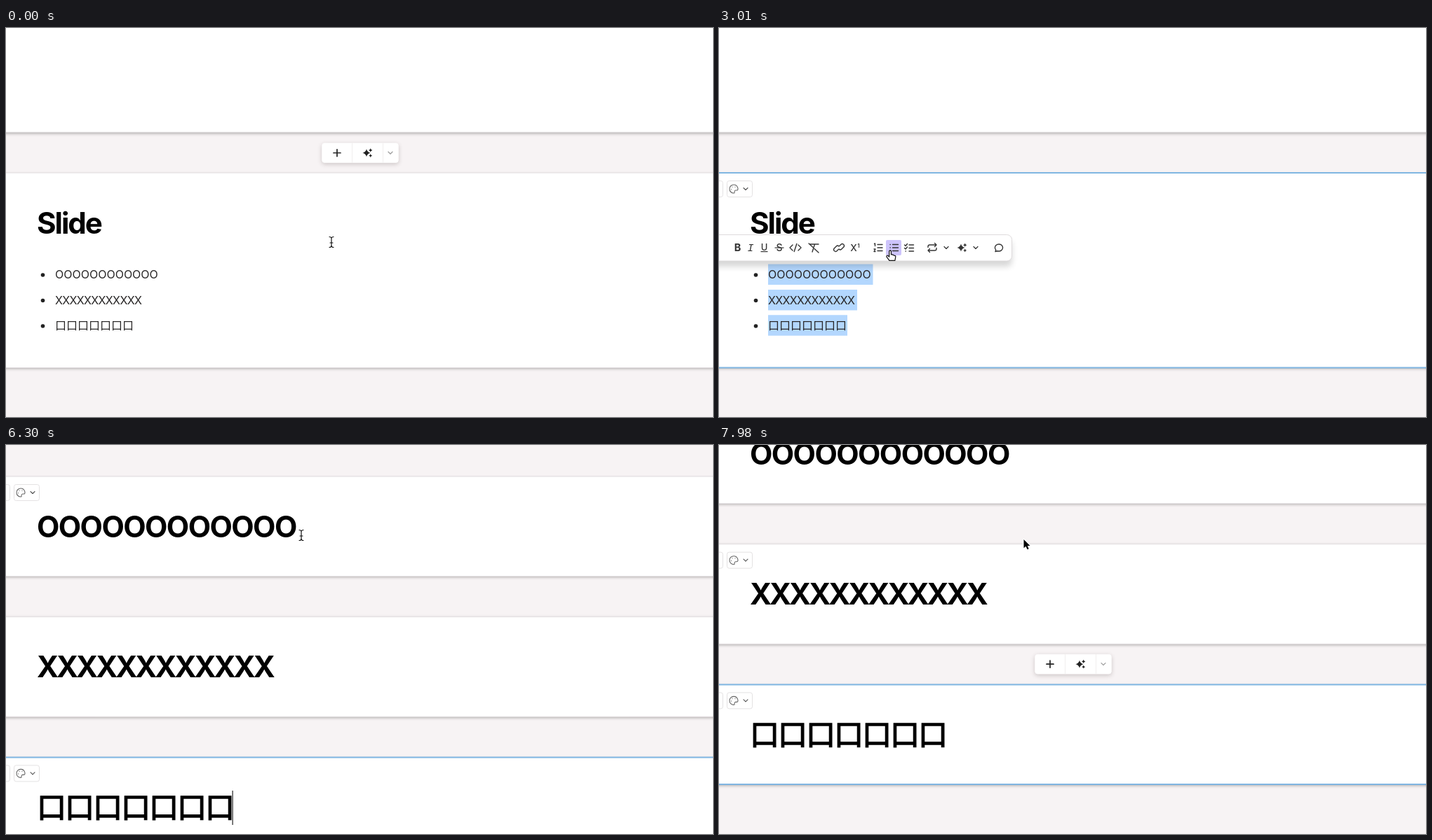
Animation, 1008 px wide and 556 px high, one loop 8 s. Source, as an HTML page with a canvas:

```html
<!DOCTYPE html>
<html lang="en">
<head>
<meta charset="utf-8">
<title>List to cards</title>
<style>
html, body { margin: 0; width: 100%; height: 100%; overflow: hidden; background: #f7f3f4; }
canvas { display: block; width: 1008px; height: 556px; }
</style>
</head>
<body>
<canvas id="stage"></canvas>
<script>
const W = 1008, H = 556, LOOP = 8000, STEP = 70, CONVERTED = 5250;
const canvas = document.getElementById('stage');
const ratio = window.devicePixelRatio || 1;
canvas.width = W * ratio;
canvas.height = H * ratio;
const ctx = canvas.getContext('2d');
const FONT = 'Inter, "Noto Sans CJK JP", "Noto Sans CJK", sans-serif';
const BLUE = '#80b6e2', INK = '#343434', PAGE = '#f7f3f4';

// Tracking is in px: body for the list, title for the card heading.
const WORDS = [
  { label: 'OOOOOOOOOOOO', body: 0, title: -1.55 },
  { label: 'XXXXXXXXXXXX', body: -.65, title: -2.95 },
  { label: '口口口口口口口', body: 0, title: -2, weight: 400, outline: 1.4 }
];

// Keyframes are [time, ...values].
const POINTER = [
  [0, 464, 306], [350, 204, 415], [630, 204, 415], [980, 188, 429], [1050, 188, 429],
  [1890, 66, 346], [2380, 66, 346], [3220, 278, 321], [3640, 313, 316], [3920, 313, 316],
  [4550, 424, 73], [5600, 424, 73], [6020, 421, 129], [7840, 421, 129], [7980, 434, 134]
];
const SCROLL = [
  [6580, 0], [6650, -12], [6720, -36.7], [6790, -60], [6860, -76], [6930, -85.2],
  [7210, -85.2], [7280, -97], [7350, -104]
];
const smooth = p => p * p * (3 - 2 * p);
const linear = p => p;
const clamp = (v, lo, hi) => Math.min(hi, Math.max(lo, v));

function track(keys, t, ease) {
  const i = keys.findIndex(k => k[0] > t);
  if (i === 0) return keys[0].slice(1);
  if (i < 0) return keys[keys.length - 1].slice(1);
  const a = keys[i - 1], b = keys[i];
  const p = ease((t - a[0]) / (b[0] - a[0]));
  return a.slice(1).map((v, j) => v + (b[j + 1] - v) * p);
}

function star(x, y, r) {
  return `M${x} ${y - r}Q${x + r * .2} ${y - r * .2} ${x + r} ${y}` +
    `Q${x + r * .2} ${y + r * .2} ${x} ${y + r}Q${x - r * .2} ${y + r * .2} ${x - r} ${y}` +
    `Q${x - r * .2} ${y - r * .2} ${x} ${y - r}Z`;
}

const ICONS = {
  plus: 'M-5 0H5M0-5V5',
  chevron: 'M-3-1.5L0 1.5L3-1.5',
  sparkle: star(-1.5, 0, 5.5) + star(4.2, -3.8, 2.6) + star(4.2, 4, 2.4),
  palette: 'M0-6A6 6 0 1 0 0 6C2.5 6-.5 2.5 2.5 2H4.5C7.5 2 6-6 0-6ZM-3.5.5v.2M-2-3v.2M2-3v.2',
  code: 'M-4-4L-8 0L-4 4M4-4L8 0L4 4M1.8-5.5L-1.8 5.5',
  clear: 'M-6-5H7M1.5-5L-2 6M-7-6L7 7',
  link: 'M-1 2.8L-3 4.8A2.7 2.7 0 0 1-6.8 1L-3.8-2A2.7 2.7 0 0 1 0-2M1-2.8L3-4.8A2.7 2.7 0 0 1 6.8-1L3.8 2A2.7 2.7 0 0 1 0 2',
  numbers: 'M-1-4.5H6M-1 0H6M-1 4.5H6M-5.5-5.5L-4.5-6V-2.5M-6 2H-4L-6 5.5H-4',
  bullets: 'M-2-4.5H6M-2 0H6M-2 4.5H6M-5.5-4.5h.3M-5.5 0h.3M-5.5 4.5h.3',
  checks: 'M0-4H6.5M0 .5H6.5M0 5H6.5M-6.5-4L-5-2.5L-2.5-5.5M-6.5 .5L-5 2L-2.5-1M-5 5h.3',
  convert: 'M-6-.5V-1.5A2.5 2.5 0 0 1-3.5-4H6M3.5-6.5L6-4L3.5-1.5M6 .5V1.5A2.5 2.5 0 0 1 3.5 4H-6M-3.5 1.5L-6 4L-3.5 6.5',
  comment: 'M-5 5.5L-4.2 3.3A5.6 5 0 1 1-1.5 4.8Z',
  cards: 'M-5-1H5V5H-5ZM-4-3.2H4M-2.5-5.2H2.5',
  list: 'M-5-5H5V5H-5ZM-2.5-2.3h.2M-2.5 0h.2M-2.5 2.3h.2M0-2.3H2.5M0 0H2.5M0 2.3H2.5',
  boxes: 'M-6-4H6V4H-6ZM-4 2L-2.7-2L-1.4 2M1-2V2H3V-2ZM1 0H3',
  person: 'M-6-4.5H6V4.5H-6ZM-4 2.5Q-2.2 0-.5 2.5M-2.2-1.5v.2M2-1.5H4M2 1H4',
  timeline: 'M-6 0H6M3.8-2L6 0L3.8 2M-3-3.5V3M1.5-3V3.5M-4.5-4h3M0 4h3',
  arrows: 'M-5-4L0 0L-5 4ZM0-4L5 0L0 4Z',
  ibeam: 'M-3-7.5Q0-7.5 0-5V5Q0 7.5-3 7.5M3-7.5Q0-7.5 0-5M0 5Q0 7.5 3 7.5M-2 1H2',
  arrow: 'M.5 1V13.3L3.5 10.7L5.5 15.3L7.7 14.4L5.7 10H9.5Z',
  hand: 'M-2 7.5L-6 2Q-6-.5-3.8 .6L-2.2 2.2V-6Q-.8-8 .6-6V-1Q2-2 3-.4Q4.5-1 5.2 .6Q7-.2 7 1.8L6 7.5Z'
};
for (const name in ICONS) ICONS[name] = new Path2D(ICONS[name]);

function icon(name, x, y, color = INK, width = 1.2, fill = false) {
  ctx.save();
  ctx.translate(x, y);
  ctx.lineCap = ctx.lineJoin = 'round';
  ctx.lineWidth = width;
  ctx.fillStyle = ctx.strokeStyle = color;
  fill ? ctx.fill(ICONS[name]) : ctx.stroke(ICONS[name]);
  ctx.restore();
}

function text(str, x, y, font, color = INK, spacing = 0, align = 'left') {
  ctx.font = `${font} ${FONT}`;
  ctx.letterSpacing = spacing + 'px';
  ctx.textAlign = align;
  ctx.fillStyle = color;
  ctx.fillText(str, x, y);
}

// The shadow is kept outside the shape, so that a fading box stays clear.
function box(x, y, w, h, { r = 0, fill, stroke, line = 1, shadow } = {}) {
  const shape = new Path2D();
  shape.roundRect(x, y, w, h, r);
  if (shadow) {
    const [color, blur, offset] = shadow;
    const outside = new Path2D();
    outside.rect(-500, -500, W + 1000, H + 1000);
    outside.addPath(shape);
    ctx.save();
    ctx.clip(outside, 'evenodd');
    ctx.shadowColor = color;
    ctx.shadowBlur = blur * ratio;
    ctx.shadowOffsetY = offset * ratio;
    ctx.fillStyle = fill;
    ctx.fill(shape);
    ctx.restore();
  }
  if (fill) { ctx.fillStyle = fill; ctx.fill(shape); }
  if (stroke) { ctx.strokeStyle = stroke; ctx.lineWidth = line; ctx.stroke(shape); }
}

function card(top, bottom, focused) {
  box(-10, top, W + 20, bottom - top, {
    fill: '#fff', stroke: focused ? BLUE : '#e2dee0', line: focused ? 2 : 1,
    shadow: ['rgba(0,0,0,.3)', 4, 1.5]
  });
}

function heading({ label, title, weight = 700, outline }, top) {
  const y = top + 86.5;
  text(label, 44, y, `${weight} 42px`, '#000', title);
  if (outline) {
    ctx.strokeStyle = '#000';
    ctx.lineWidth = outline;
    ctx.strokeText(label, 44, y);
  }
}

function paletteButton(top) {
  const y = top + 23;
  box(-30, y - 11.5, 35.5, 23, { r: 3, fill: '#fff', stroke: '#e4e2e3' });
  box(11.5, y - 11.5, 36, 23, { r: 3, fill: '#fff', stroke: '#e4e2e3' });
  icon('palette', 21, y, '#666', 1.1);
  icon('chevron', 38, y, '#555', 1.1);
}

function insertBar(y) {
  box(450.5, y - 14, 109, 28, { r: 4, fill: '#fff', shadow: ['rgba(60,40,40,.24)', 6, 2] });
  box(493, y - 14, 1, 28, { fill: '#f0eeee' });
  box(537, y - 14, 1, 28, { fill: '#f0eeee' });
  icon('plus', 472, y, '#222', 1.7);
  icon('sparkle', 515.5, y, '#222', 1, true);
  icon('chevron', 548, y, '#999', 1.2);
}

function selection(x, y) {
  const ends = [219.5, 197, 183];
  const current = clamp(Math.round((y - 352) / 36.4), 0, 2);
  for (let i = current; i < 3; i++) {
    const left = i === current ? clamp(x, 70, ends[i]) : 70;
    box(left, 337.5 + i * 36.4, ends[i] - left, 29.5, { fill: '#b3d7fe' });
  }
}

function formatBar(hovering) {
  const y = 314;
  box(-20, 295.5, 437.5, 37.5, { r: 7, fill: '#fff', stroke: '#dedbdc', shadow: ['rgba(0,0,0,.16)', 8, 8] });
  box(238, 303, 22, 22, { r: 2, fill: '#cdc4fb' });
  if (hovering) box(293, 303, 41, 22, { r: 2, fill: '#f5f2f3' });
  text('B', 26.5, y + 5.2, '700 14.5px', INK, 0, 'center');
  text('I', 45, y + 5.2, 'italic 500 15px "Liberation Mono",', INK, 0, 'center');
  text('U', 64.5, y + 4, '500 13px', INK, 0, 'center');
  box(59.5, 319, 10, 1.2, { fill: INK });
  text('S', 86, y + 5, '500 14px', INK, 0, 'center');
  box(79.5, 313.5, 13, 1.2, { fill: INK });
  text('X', 192, y + 5, '500 13.5px', INK, 0, 'center');
  text('1', 199, y, '600 8px', INK, 0, 'center');
  const row = { code: 109, clear: 135, link: 171, numbers: 227, bullets: 249.5, checks: 271, convert: 304, comment: 399 };
  for (const name in row) icon(name, row[name], y, INK, 1.4);
  icon('sparkle', 346.5, y, INK, 1, true);
  icon('chevron', 324, y);
  icon('chevron', 366, y);
}

function transformMenu(alpha, pointerY) {
  const rows = [
    ['list', 'Bullets layout'], ['boxes', 'Text boxes layout'], ['person', 'Images with text layout'],
    ['timeline', 'Timeline layout'], ['arrows', 'Arrows layout']
  ];
  const hovered = pointerY > 110 && pointerY < 269 ? Math.floor((pointerY - 110) / 31.7) : -1;
  ctx.save();
  ctx.globalAlpha = alpha;
  box(293, 28, 333, 268, { r: 6, fill: '#fff', shadow: ['rgba(0,0,0,.14)', 8, 4] });
  text('Transform list', 307, 50.5, '600 11.5px', '#666');
  if (hovered < 0) box(300.5, 62.5, 318, 47.5, { r: 3, fill: '#fcfbfb', stroke: '#cfcccd' });
  else box(300.5, 111 + hovered * 31.7, 318, 31, { r: 3, fill: '#f6f3f4' });
  icon('cards', 317, 86, '#333');
  text('Cards from outline', 334, 82, '500 13.2px', '#333');
  text('Turn bullet points into cards', 334, 100.5, '400 11.5px', '#777');
  rows.forEach(([name, label], i) => {
    const y = 126.3 + i * 31.6;
    icon(name, 317, y, '#333', 1.1);
    text(label, 334, y + 4.8, '500 13.2px', '#333');
  });
  text('Nest inside', 307, 289, '600 11.5px', '#666');
  ctx.restore();
}

function tooltip() {
  box(275.5, 274.5, 77, 21.5, { r: 2, fill: '#434142', stroke: '#2f2d2e' });
  text('Convert to...', 314, 289, '600 11px', '#fff', 0, 'center');
}

function listScene(t, x, y) {
  const focused = t >= 1120 && t < 3920;
  const overBar = t > 2450 && x > 293 && y > 295 && y < 333;
  card(-20, 149, false);
  card(207, 485.5, focused);
  if (t >= 140) paletteButton(207);
  heading({ label: 'Slide', title: -2 }, 207);
  if (t >= 1120) selection(...track(POINTER, Math.min(t, 1890), smooth));
  WORDS.forEach(({ label, body }, i) => {
    const line = 352 + i * 36.5;
    ctx.beginPath();
    ctx.arc(52.5, line + 1, 2.8, 0, 7);
    ctx.fillStyle = '#222';
    ctx.fill();
    text(label, 70, line + 6, '400 16px', '#272525', body);
  });
  if (t >= 1820 && t < 2520) {
    box(22.5, 343.5, 13, 18, { r: 2, fill: '#fff', stroke: '#e4e2e3' });
    for (const dy of [-4, 0, 4]) box(28.2, 351.7 + dy, 1.7, 1.7, { fill: '#777' });
  }
  if (t < 140) insertBar(178.5);
  else if (t >= 210 && t < 2800) insertBar(514);
  if (t >= 3920) transformMenu([.5, .85][(t - 3920) / STEP] || 1, y);
  if (t >= 2030) {
    ctx.globalAlpha = t < 2100 ? .6 : 1;
    formatBar(overBar);
    ctx.globalAlpha = 1;
  }
  if (t >= 3430 && t < 4060) tooltip();
}

function closingPanel() {
  ctx.save();
  ctx.globalAlpha = .76;
  box(-180, -200, 332, 410.5, { r: 9, fill: '#fff', shadow: ['rgba(0,0,0,.14)', 10, 4] });
  [['Introduce a section. Highlight key', 126, 5], ['Nested within card. Good for', 95, 75],
   ['notes', 7, 93], ['Text with emphasis', 52, 145], ['Text in a box and icon', 91, 196]]
    .forEach(([label, right, base]) => text(label, right, base, '500 12px', '#aaa', 0, 'right'));
  ctx.restore();
}

function cardScene(t) {
  const [scroll] = track(SCROLL, t, linear);
  const settled = t >= 5390;
  const showPalette = [t >= 5670, t >= 7910, settled];
  const tops = WORDS.map((_, i) => 45 + i * 200.7 + scroll);
  tops.forEach((top, i) => {
    card(top, top + 142.6, i === 2 && settled);
    if (showPalette[i]) paletteButton(top);
    heading(WORDS[i], top);
  });
  const caretOn = t > CONVERTED && Math.floor((t - 5230) / 530) % 2 === 0;
  if (caretOn) box(322.5, tops[2] + 47.5, 1.2, 49, { fill: '#222' });
  if (t >= 6650 && t < 7560) insertBar(tops[0] + 171.5);
  else if (t >= 7700) insertBar(tops[1] + 171.5);
  if (t < 5320) closingPanel();
}

function pointer(t, x, y) {
  if (t >= 7070) {
    icon('arrow', x, y, '#fff', 2.4);
    icon('arrow', x, y, '#000', 1, true);
  } else if (t > 2450 && t < CONVERTED && y < 333) {
    icon('hand', x, y, '#fff', 1, true);
    icon('hand', x, y, '#111', 1.2);
  } else {
    icon('ibeam', x, y, '#fff', 2.6);
    icon('ibeam', x, y, '#111', 1.2);
  }
}

function draw(time) {
  const t = Math.floor((time % LOOP) / STEP) * STEP;
  const [x, y] = track(POINTER, t, smooth);
  ctx.setTransform(ratio, 0, 0, ratio, 0, 0);
  ctx.fillStyle = PAGE;
  ctx.fillRect(0, 0, W, H);
  t < CONVERTED ? listScene(t, x, y) : cardScene(t);
  pointer(t, x, y);
}

const start = performance.now();
function loop() {
  draw(performance.now() - start);
  requestAnimationFrame(loop);
}
loop();
</script>
</body>
</html>
```
